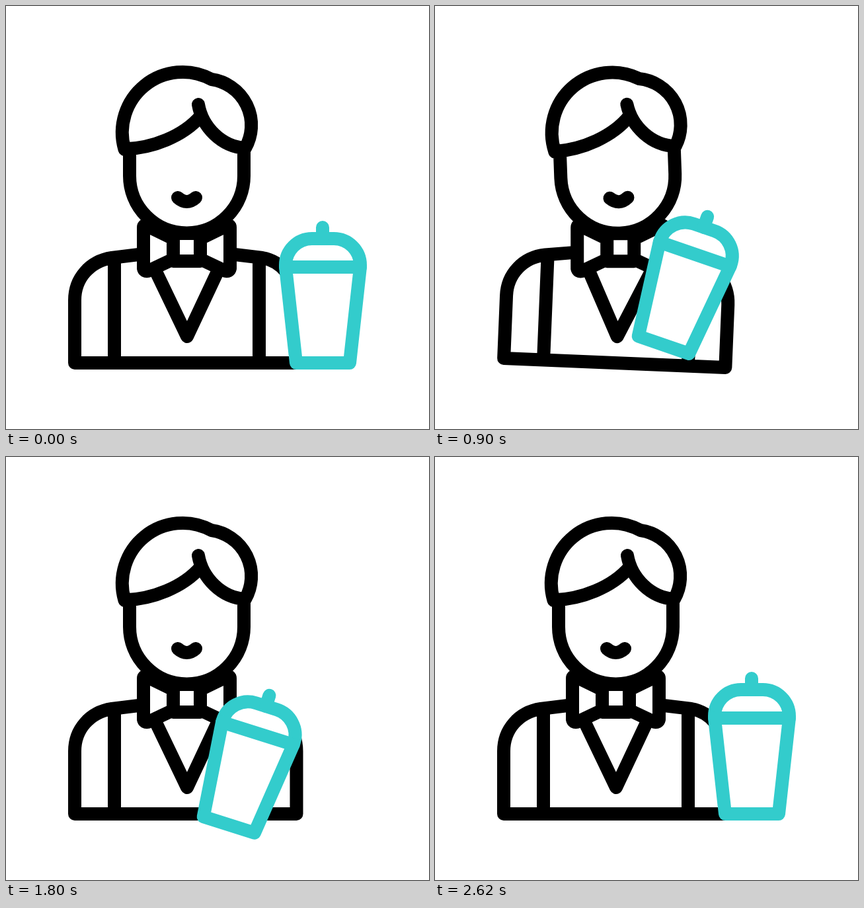
Animation, 640 px wide and 640 px high, one loop 2.8 s. Source, as an HTML page with a canvas:

```html
<!DOCTYPE html>
<html lang="en">
<head>
<meta charset="utf-8">
<title>Bartender with shaker</title>
<style>
  html, body { margin: 0; width: 100%; height: 100%; overflow: hidden; background: #fff; }
  canvas { display: block; width: 100vmin; height: 100vmin; }
</style>
</head>
<body>
<canvas id="stage" width="640" height="640"></canvas>
<script>
const LOOP = 2800;
const BLACK = '#000', TEAL = '#33cccc';
const ctx = document.getElementById('stage').getContext('2d');
const rad = deg => deg * Math.PI / 180;
const mix = (a, b, k) => a + (b - a) * k;
const clamp = v => Math.min(1, Math.max(0, v));
const swing = u => (1 - Math.cos(Math.PI * u)) / 2;
const easeOut = (u, power) => 1 - Math.pow(1 - u, power);

const shapes = {
  body: new Path2D('M205 375.5 L160 381 C127 386 104 412 104 445 V540 H439.5 V445 C439.5 412 416 386 388 381 L342 375.5' +
    ' M164 382 V540 M383 382 V540 M226 400 L274 500 L321 400'),
  bow: new Path2D('M253 344 H294 V386 H253 Z M253 352 L212 332 Q208 331 208 335 V397 Q209 402 215 401 L253 383' +
    ' M294 352 L335 332 Q339 331 339 335 V397 Q338 402 332 401 L294 383'),
  head: new Path2D('M187 220 V257 A86.5 86.5 0 0 0 360 257 V217' +
    ' M179.5 217 A91.5 91.5 0 0 1 311 111 A70 70 0 0 1 362 215' +
    ' M179.5 216.5 C222 215 268 197 294 167 M291 149 C297 183 326 213 362 215' +
    ' M260 290 Q273.5 302 287 290'),
  cup: new Path2D('M423 395 V392 C423 370 441 352 463 352 H496 C518 352 536 370 536 392 V395 L520 540 H439 Z'),
  cupLines: new Path2D('M423 395 H536 M479 335 V352')
};

// Swings between [time, value] keys.
function keyed(t, keys) {
  let i = 0;
  while (i < keys.length - 2 && t > keys[i + 1][0]) i++;
  const [t0, a] = keys[i], [t1, b] = keys[i + 1];
  return mix(a, b, swing(clamp((t - t0) / (t1 - t0))));
}

// Cubic curve through [time, value, slope] keys.
function hermite(t, keys) {
  let i = 0;
  while (i < keys.length - 2 && t > keys[i + 1][0]) i++;
  const [t0, a, sa] = keys[i], [t1, b, sb] = keys[i + 1];
  const d = t1 - t0, u = clamp((t - t0) / d), v = 1 - u;
  return v * v * (1 + 2 * u) * a + u * v * v * d * sa + u * u * (3 - 2 * u) * b - u * u * v * d * sb;
}

function bezier(s, a, b, c, d) {
  const r = 1 - s;
  return r * r * r * a + 3 * r * r * s * b + 3 * r * s * s * c + s * s * s * d;
}

const REST = { x: 479.5, y: 540 }, UP = { x: 346, y: 512.3 }, DOWN = { x: 325, y: 556.5 };
const TILT = 19, START = 280, SHAKE = 924, SHAKE_END = 1599.5, BACK = 1760, END = 2620;
const HALF_SHAKE = (SHAKE_END - SHAKE) / 7;

function cupPose(t) {
  if (t < SHAKE) {
    const u = clamp((t - START) / (SHAKE - START)), s = easeOut(u, 1.75);
    return {
      x: bezier(s, REST.x, 412, 344, UP.x),
      y: bezier(s, REST.y, 548, 567, UP.y),
      angle: TILT * easeOut(u, 2.27)
    };
  }
  if (t < BACK) {
    const k = swing((Math.min(t, SHAKE_END) - SHAKE) / HALF_SHAKE);
    return { x: mix(UP.x, DOWN.x, k), y: mix(UP.y, DOWN.y, k), angle: TILT };
  }
  const k = easeOut(clamp((t - BACK) / (END - BACK)), 1.7);
  return {
    x: mix(DOWN.x, REST.x, k),
    y: hermite(t, [[BACK, DOWN.y, 0], [2020, 550, -0.08], [2300, 506, -0.42], [2415, 461, 0], [END, REST.y, 0]]),
    angle: TILT * (1 - k)
  };
}

function place(pivot, to, angle, paint) {
  ctx.save();
  ctx.translate(to.x, to.y);
  ctx.rotate(rad(angle));
  ctx.translate(-pivot.x, -pivot.y);
  paint();
  ctx.restore();
}

const HIP = { x: 272, y: 540 }, NECK = { x: 273.5, y: 365 };

function draw(t) {
  const lean = keyed(t, [[START, 0], [620, -4.85], [975, 3.2], [1360, 0]]);
  const nod = keyed(t, [[START, 0], [620, -2], [975, -2.1], [1360, 0]]);
  const dx = NECK.x - HIP.x, dy = NECK.y - HIP.y;
  const c = Math.cos(rad(lean)), s = Math.sin(rad(lean));
  const neck = { x: HIP.x + dx * c - dy * s, y: HIP.y + dx * s + dy * c };

  ctx.fillStyle = '#fff';
  ctx.fillRect(0, 0, 640, 640);
  ctx.lineWidth = 20;
  ctx.lineCap = ctx.lineJoin = 'round';

  ctx.strokeStyle = BLACK;
  place(HIP, HIP, lean, () => ctx.stroke(shapes.body));
  place(NECK, neck, 0, () => {
    ctx.fill(shapes.bow);
    ctx.stroke(shapes.bow);
  });
  place(NECK, neck, nod, () => ctx.stroke(shapes.head));

  ctx.strokeStyle = TEAL;
  const cup = cupPose(t);
  place(REST, cup, cup.angle, () => {
    ctx.fill(shapes.cup);
    ctx.stroke(shapes.cup);
    ctx.stroke(shapes.cupLines);
  });
}

function tick() {
  draw(performance.now() % LOOP);
  requestAnimationFrame(tick);
}
tick();
</script>
</body>
</html>
```
